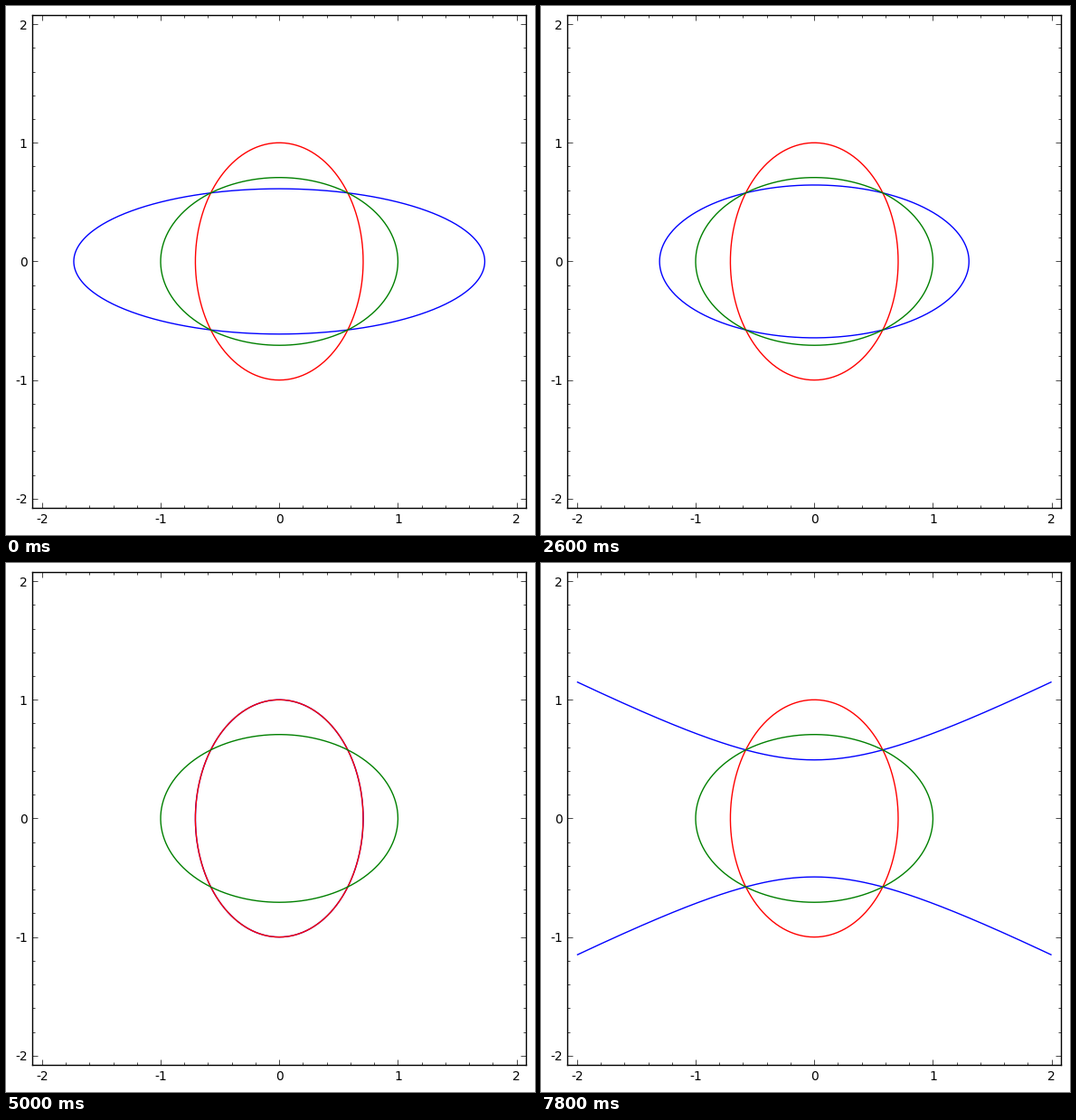
A matplotlib script that plays this animation: 585x585 px, repeating every 8 s.

```python
"""Pencil of conics a*x^2 + b*y^2 = 1 through four fixed points (a + b = 3)."""
import numpy as np
import matplotlib.pyplot as plt
from matplotlib.animation import FuncAnimation
from matplotlib.ticker import FixedLocator, FuncFormatter, MultipleLocator

SIZE, DPI = 585, 100
FRAMES, INTERVAL = 40, 200
CX, CY, HALF = 302.2, 282.45, 272.9   # axes centre and half side, in pixels
LIMIT, REACH = 2.08, 2.0

plt.rcParams.update({"font.family": "DejaVu Sans", "font.size": 10})


def branches(u, v):
    """Join the mirrored branches (u, v) and (u, -v) with a gap."""
    return np.r_[u, np.nan, u], np.r_[v, np.nan, -v]


def conic(q):
    """Points of the conic of the pencil whose x^2 coefficient is 1/q."""
    s = np.linspace(-REACH, REACH, 401)
    if q == 0:
        return branches(s, s)
    a = 1 / q
    b = 3 - a
    if a > 0 and b > 0:
        t = np.linspace(0, 2 * np.pi, 401)
        return np.cos(t) / np.sqrt(a), np.sin(t) / np.sqrt(b)
    if a > 0:
        y, x = branches(s, np.sqrt((1 - b * s**2) / a))
        return x, y
    return branches(s, np.sqrt((1 - a * s**2) / b))


fig = plt.figure(figsize=(SIZE / DPI, SIZE / DPI), dpi=DPI, facecolor="white")
ax = fig.add_axes([(CX - HALF) / SIZE, 1 - (CY + HALF) / SIZE,
                   2 * HALF / SIZE, 2 * HALF / SIZE])
ax.set(xlim=(-LIMIT, LIMIT), ylim=(-LIMIT, LIMIT))

for axis in (ax.xaxis, ax.yaxis):
    axis.set_major_locator(FixedLocator(range(-2, 3)))
    axis.set_minor_locator(MultipleLocator(0.2))
    axis.set_major_formatter(FuncFormatter(lambda v, _: f"{v:.0f}"))
ax.tick_params(which="both", direction="in", top=True, right=True, width=0.5)
ax.tick_params(which="major", length=4, pad=4)
ax.tick_params(which="minor", length=2)
for spine in ax.spines.values():
    spine.set_linewidth(1)


def curve(q, color):
    return ax.plot(*conic(q), color=color, lw=1, solid_capstyle="butt")[0]


moving = curve(3, "blue")
curve(0.5, "red")
curve(1, "green")


def update(i):
    moving.set_data(*conic((30 - i) / 10))
    return (moving,)


anim = FuncAnimation(fig, update, frames=FRAMES, interval=INTERVAL,
                     repeat=True, repeat_delay=0)
plt.show()
```
